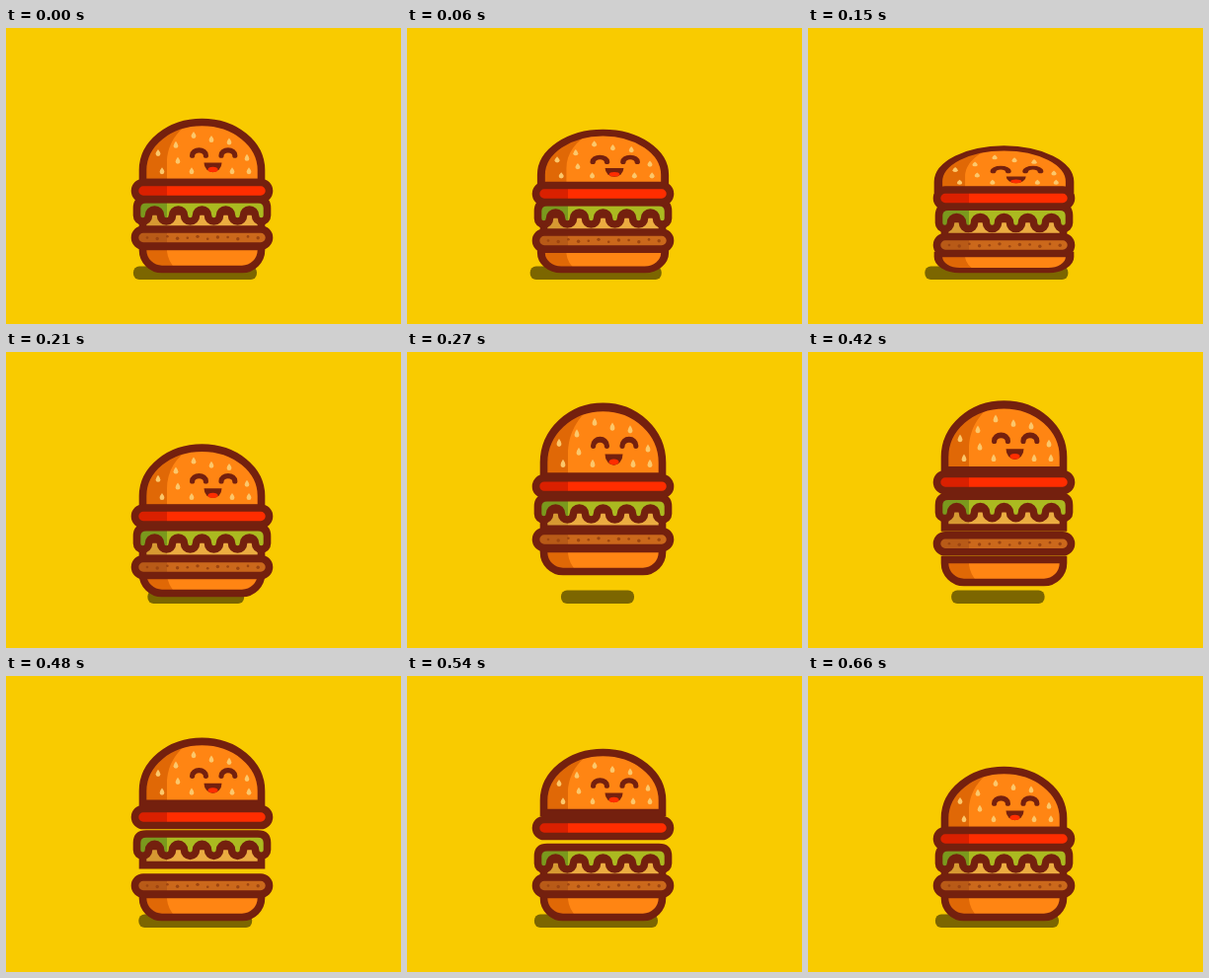
An HTML page that plays this animation: 400 px wide and 300 px high, repeating every 1020 ms.

```html
<!DOCTYPE html>
<html lang="en">
<head>
<meta charset="utf-8">
<title>Bouncing burger</title>
<style>
html, body { margin: 0; width: 100%; height: 100%; overflow: hidden; background: #f9cb00; }
svg { display: block; width: 100%; height: 100%; }
</style>
</head>
<body>
<svg id="stage" viewBox="0 0 400 300">
  <rect width="400" height="300" fill="#f9cb00"/>
  <rect id="shadow" y="241.5" height="13.5" rx="6" fill="#7c6600"/>
</svg>
<script>
const NS = 'http://www.w3.org/2000/svg';
const LINE = '#74200e', RED = '#ff2d00', BUN = '#ff8513', BUN_SHADE = '#e06806';
const MID = 198.5;
const stage = document.getElementById('stage');
const shadow = document.getElementById('shadow');

function add(parent, tag, attrs) {
  const el = document.createElementNS(NS, tag);
  for (const k in attrs) el.setAttribute(k, attrs[k]);
  parent.appendChild(el);
  return el;
}

// A filled shape, its shaded left side and its outline.
function layer(name, d, color, shade, shadeD = 'M120 80H163V260H120Z') {
  const g = add(stage, 'g', {});
  add(add(g, 'clipPath', { id: name }), 'path', { d });
  add(g, 'path', { d, fill: color });
  add(g, 'path', { d: shadeD, fill: shade, 'clip-path': `url(#${name})` });
  add(g, 'path', { d, fill: 'none', stroke: LINE, 'stroke-width': 7.6 });
  return g;
}

const pill = y => `M139 ${y}H258a8.5 8.5 0 0 1 0 17H139a8.5 8.5 0 0 1 0 -17Z`;

// The lower edge is a row of equal half circles, alternately down and up.
function lettucePath() {
  let d = 'M142 173.6H255Q264.5 173.6 264.5 182.6V190';
  for (let i = 0; i < 11; i++) d += `a6 6 0 0 ${1 - i % 2} -12 0`;
  return d + 'V182.6Q132.5 173.6 142 173.6Z';
}

const base = layer('base', 'M138.5 221.5H258.5V225A19.5 19.5 0 0 1 239 244.5H158A19.5 19.5 0 0 1 138.5 225Z',
  BUN, BUN_SHADE, 'M130 215H163V226Q164 238 174 246H130Z');
const cheese = layer('cheese', 'M138.5 186H258.5V205.3H138.5Z', '#ebac41', '#d69932');
const patty = layer('patty', pill(204), '#cb681b', '#b85a17');
const lettuce = layer('lettuce', lettucePath(), '#abba20', '#7a991d');
const bun = layer('bun', 'M138.5 156.5V144A60 48.5 0 0 1 258.5 144V156.5Z',
  BUN, BUN_SHADE, 'M130 90H199C177 98 163 115 163 137V165H130Z');
const tomato = layer('tomato', pill(156.5), RED, '#da2000');

for (let i = 0; i < 12; i++)
  add(patty, 'circle', {
    cx: 143 + 10.2 * i, cy: 212.5 + 1.3 * Math.sin(2.3 * i), r: i % 2 ? 1.7 : 1.3, fill: '#9d4511'
  });

function seed(x, y) {
  add(bun, 'path', { d: `M${x} ${y - 3.8}q2.4 3 2.4 4.6a2.4 2.4 0 0 1 -4.8 0q0 -1.6 2.4 -4.6Z`, fill: '#fbc76c' });
}
// One arch of seeds under the crust, one row around the mouth.
for (let i = 0; i < 6; i++) {
  const x = 154 + 18 * i;
  seed(x, 110 + 0.0095 * (x - MID) ** 2 + (i % 2 ? 2 : -2));
}
for (const x of [158, 188, 229, 246]) seed(x, 145);
seed(174, 134.5);

for (const x of [188.6, 218])
  add(bun, 'path', {
    d: `M${x} 129.2a6.9 5.4 0 0 1 13.8 0`, fill: 'none', stroke: LINE,
    'stroke-width': 5.2, 'stroke-linecap': 'round'
  });
add(bun, 'path', { d: 'M200.5 136.5H218.5A9 9.7 0 0 1 200.5 136.5Z', fill: LINE });
add(bun, 'ellipse', { cx: 209.5, cy: 143.4, rx: 5, ry: 2.6, fill: RED });

const LOOP = 1020, STEP = 30;
const CROUCH = 150, SPRING = 210, STRETCH = 240, PEAK = 300, DROP = 360;

// Linear interpolation through [time, value] points.
function at(t, ...points) {
  for (let i = 1; i < points.length; i++) {
    const [t0, a] = points[i - 1], [t1, b] = points[i];
    if (t <= t1) return a + (b - a) * (t - t0) / (t1 - t0);
  }
  return points[points.length - 1][1];
}

// Height of a layer: crouch, spring up, hang, fall until its own landing time.
const hop = (t, low, rise, top, land) =>
  at(t, [0, 0], [CROUCH, low], [SPRING, rise], [PEAK, top], [DROP, top], [land, 0]);

// A size that changes with the crouch and the stretch.
const flex = (t, rest, low, top) =>
  at(t, [0, rest], [CROUCH, low], [STRETCH, top], [DROP, top], [510, rest]);

function place(part, y, pivot = 0, sx = 1, sy = 1) {
  part.setAttribute('transform',
    `translate(${MID} ${pivot + y}) scale(${sx} ${sy}) translate(${-MID} ${-pivot})`);
}

function draw(ms) {
  const t = Math.floor((ms % LOOP) / STEP) * STEP;
  const press = at(t, [0, 0], [CROUCH, 1], [SPRING, 0]);
  const wide = 1 + 0.11 * press;
  const leaf = hop(t, 7.5, 4, -41, 540);
  place(base, hop(t, 0, 0, -33, 450), 248, wide, 1 - 0.3 * press);
  place(patty, hop(t, 7.5, 5.5, -36.5, 480));
  place(cheese, leaf);
  place(lettuce, leaf);
  place(tomato, hop(t, 7.5, 1.5, -44, 600));
  place(bun, hop(t, 7, 2, -45, 660), 160, wide, flex(t, 1, 0.7, 1.16));
  const w = flex(t, 125, 145, 74);
  shadow.setAttribute('width', w);
  shadow.setAttribute('x', 195.2 - 0.53 * w);
}

const start = performance.now();
function tick() {
  draw(performance.now() - start);
  requestAnimationFrame(tick);
}
tick();
</script>
</body>
</html>
```
